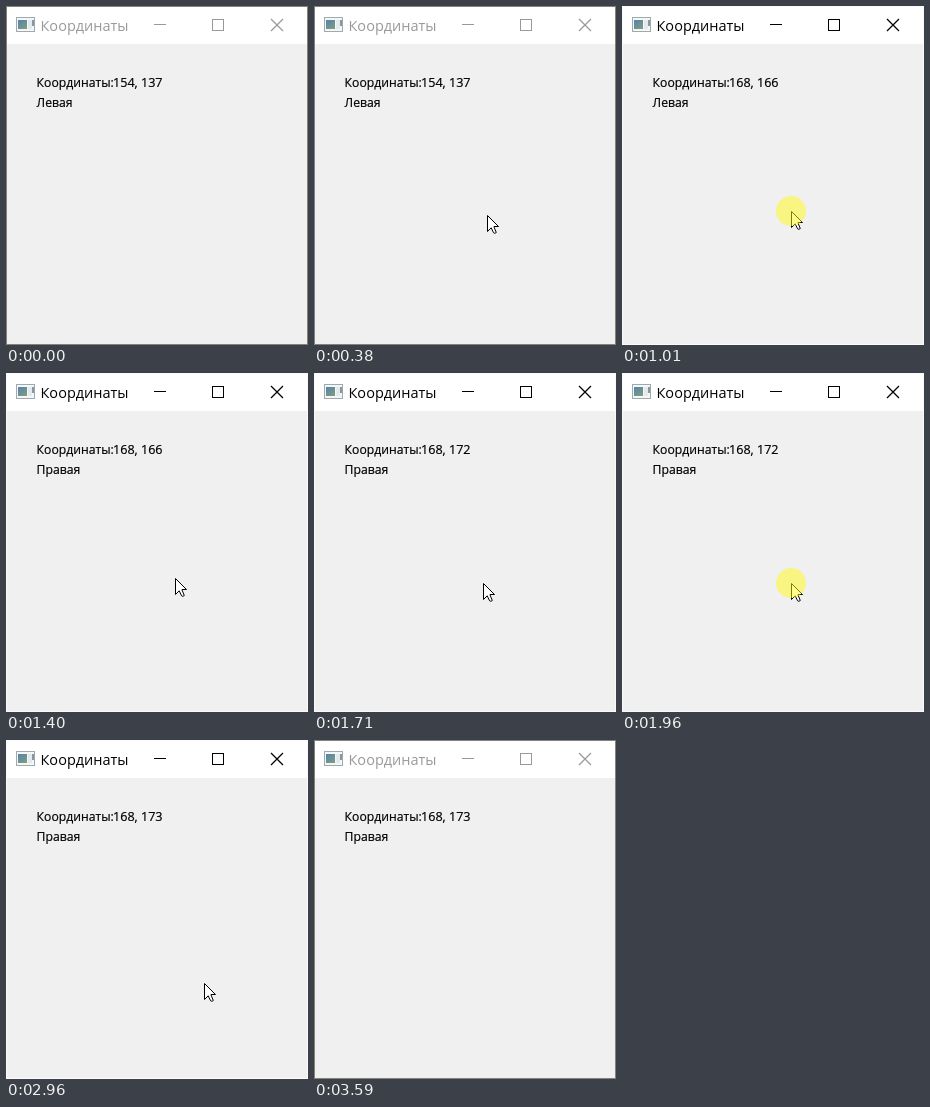
Animation of 302 by 339 pixels, one loop 3670 ms. Source, as an HTML page:

```html
<!DOCTYPE html>
<html lang="ru">
<head>
<meta charset="utf-8">
<title>Координаты</title>
<style>
  html, body { margin: 0; width: 100%; height: 100%; overflow: hidden; background: #f0f0f0; }
  svg { display: block; width: 302px; height: 339px; }
  text { font-family: "Open Sans", "Noto Sans", sans-serif; white-space: pre; }
  .title { font-size: 14.5px; }
  .label { font-size: 12.2px; fill: #000; stroke: #000; stroke-width: 0.2px; }
  .value { font-size: 12.6px; }
</style>
</head>
<body>
<svg viewBox="0 0 302 339">
  <defs>
    <linearGradient id="pic" x1="0" y1="0" x2="0.6" y2="1">
      <stop offset="0" stop-color="#5583ad"/>
      <stop offset="1" stop-color="#789a86"/>
    </linearGradient>
  </defs>
  <rect width="302" height="339" fill="#f0f0f0"/>
  <rect width="302" height="38" fill="#fff"/>
  <rect id="border" x="0.5" y="0.5" width="301" height="338" fill="none"/>

  <g shape-rendering="crispEdges">
    <rect x="10.5" y="11.5" width="18" height="14" fill="#f5f6f6" stroke="#a0a9ad"/>
    <rect x="12" y="14" width="9" height="9" fill="url(#pic)"/>
    <rect x="22" y="14" width="4" height="9" fill="#e3eaed"/>
    <rect x="26" y="14" width="2" height="6" fill="#8797a1"/>
  </g>

  <g id="chrome">
    <text class="title" x="34.5" y="25">Координаты</text>
    <g fill="none" stroke="currentColor">
      <path d="M148 18.5H160M206.5 13.5h11v11h-11z" shape-rendering="crispEdges"/>
      <path d="M265 13l12 12M277 13l-12 12" stroke-width="1.25"/>
    </g>
  </g>

  <text class="label" x="30.6" y="81">Координаты:</text>
  <text class="label value" id="value" x="107" y="81"></text>
  <text class="label" id="button" x="30.6" y="101"></text>

  <g id="pointer">
    <path d="M.5.5V16.5L4.2 12.8 6.6 17.8Q7.8 19 9.3 17.5L7 12V11.5H11.5Z" fill="#fff" stroke="#000"/>
    <circle id="halo" r="15" fill="#fffa14" fill-opacity="0.5"/>
  </g>
</svg>
<script>
const LOOP = 3670;
const STEP = 75;         // the pointer moves in ticks
const SECOND = 150;      // delay from the left press to the right one
const TOP = 38;          // height of the title bar
const ENTER = 150, FOCUS = 630, LEAVE = 2660, EDGE = 3110, GONE = 3420, BLUR = 3590;

const presses = [
  { down: FOCUS, up: 780, y: 202.6 },
  { down: 930, up: 1160, y: 204.6 },
  { down: 1560, up: 1710, y: 210.2 },
  { down: 1790, up: 2200, y: 210.2 },
  { down: 2280, up: LEAVE, y: 211.1 }
];
const start = { x: 226, y: 317 };
const rest = { x: 169, y: 202 };
const edge = { x: 257, y: 306 };
const exit = { x: 268, y: 340 };

const easeIn = p => p ** 2.7;
const easeOut = p => 1 - (1 - p) ** 2;
const el = id => document.getElementById(id);
const show = (id, on) => el(id).setAttribute("visibility", on ? "visible" : "hidden");
const lastPress = t => presses.findLast(press => press.down <= t);

function glide(a, b, t, from, to, ease) {
  const ticks = Math.floor((t - from) / STEP);
  const p = ease(Math.min(1, ticks * STEP / (to - from)));
  return { x: a.x + (b.x - a.x) * p, y: a.y + (b.y - a.y) * p };
}

function pointerAt(t) {
  if (t < ENTER || t >= GONE) return null;
  if (t >= EDGE) return glide(edge, exit, t, EDGE, GONE, easeOut);
  const press = lastPress(t + STEP);
  if (!press) return glide(start, rest, t, ENTER, ENTER + 4 * STEP, easeOut);
  const spot = { x: rest.x, y: press.y };
  return t < LEAVE ? spot : glide(spot, edge, t, LEAVE, EDGE, easeIn);
}

function draw(t) {
  const active = t >= FOCUS && t < BLUR;
  const ink = active ? "#000" : "#999";
  el("chrome").setAttribute("fill", ink);
  el("chrome").setAttribute("color", ink);
  el("border").setAttribute("stroke", active ? "#fafafa" : "#83837a");

  const press = lastPress(t);
  el("value").textContent = press ? `${rest.x - 1}, ${Math.floor(press.y) - TOP}` : "154, 137";
  el("button").textContent = press && t >= press.down + SECOND ? "Правая" : "Левая";

  const pos = pointerAt(t);
  show("pointer", pos);
  show("halo", pos && press && t < press.up);
  if (pos) el("pointer").setAttribute("transform", `translate(${Math.round(pos.x)} ${Math.round(pos.y)})`);
}

const began = performance.now();
function tick() {
  draw((performance.now() - began) % LOOP);
  requestAnimationFrame(tick);
}
tick();
</script>
</body>
</html>
```
